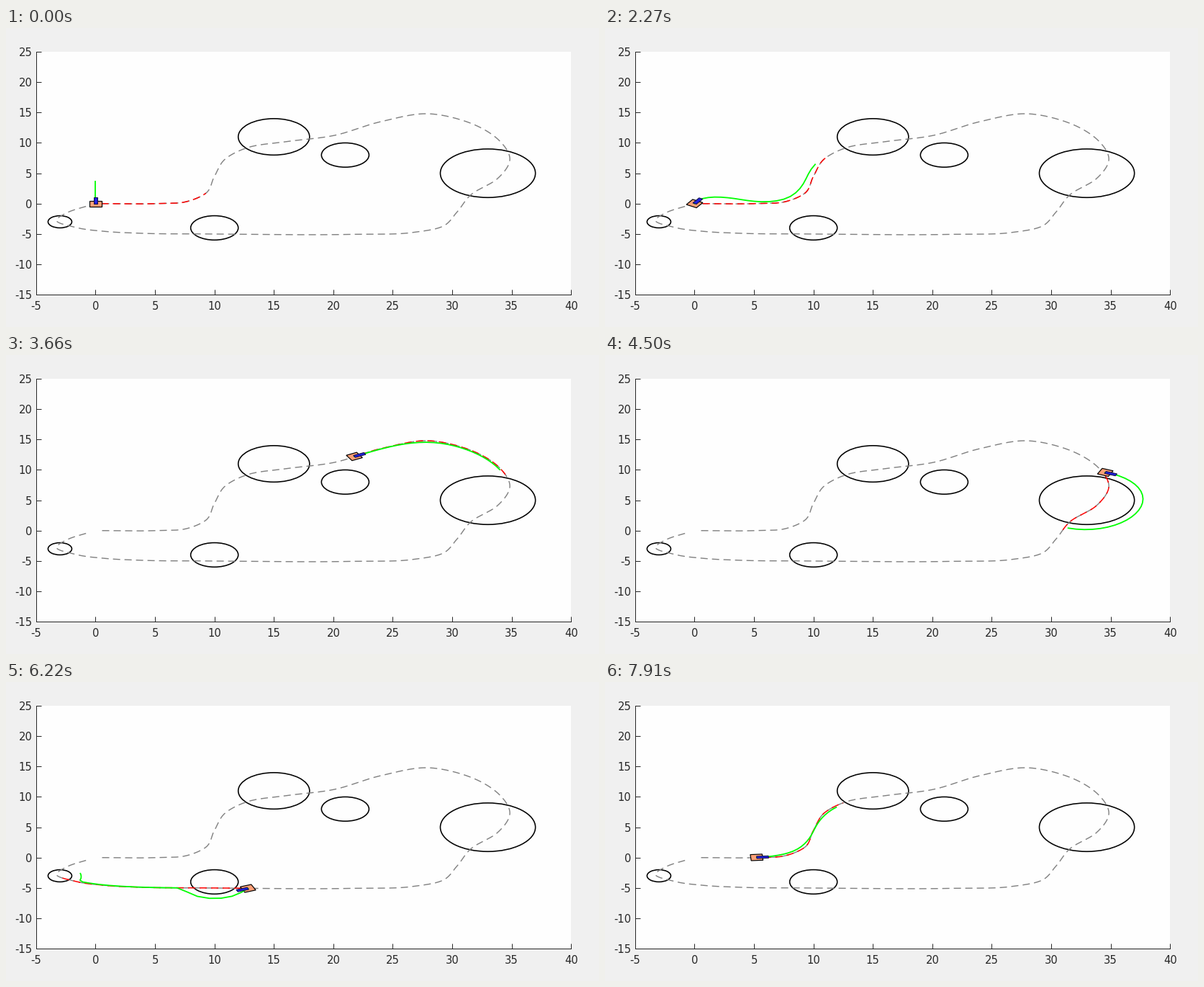
Write a matplotlib script that moves like this. It is 824x415 px and loops after 8 s.

```python
import numpy as np
import matplotlib.pyplot as plt
from matplotlib.animation import FuncAnimation
from matplotlib.patches import Ellipse, Polygon

WIDTH, HEIGHT, DPI = 824, 415, 100
LOOP_MS, STEP_MS = 8000, 40
PX = 72 / DPI
INK = "#262626"

plt.rcParams["font.family"] = "DejaVu Sans"
plt.rcParams["axes.unicode_minus"] = False
plt.rcParams["lines.scale_dashes"] = False

# x, y, radius
OBSTACLES = [(15, 11, 3), (21, 8, 2), (33, 5, 4), (10, -4, 2), (-3, -3, 1)]
MARGIN = .85

WAYPOINTS = [
    (0, 0), (.6, 0), (5, 0), (7.6, .3), (9.2, 1.6), (10, 4.5), (11, 7.5),
    (12.75, 9.2), (16, 10.2), (20, 11.2), (24, 13.5), (28, 14.8),
    (31.2, 13.5), (33.9, 10.5), (34.85, 7.3), (33.8, 4.1), (31.6, 1.5),
    (30.4, -1.4), (29.2, -3.75), (26.7, -4.75), (22, -5.05), (10, -5),
    (4, -4.9), (.9, -4.6), (-1.5, -4), (-3.3, -2.75), (-2.4, -1.5),
    (-.7, -.4), (0, 0)]

# When the robot passes a few places: ms, x, y
PASSES = np.array([
    (2200, 0, 0), (2270, .15, 0), (2530, 3.8, 0), (3660, 22.1, 12.4),
    (4500, 34.9, 9.5), (5520, 28.9, -3.8), (6330, 9.9, -6.7),
    (6700, -.8, -4.4), (7090, -1.4, -2.2), (7910, 5.6, 0),
    (8710, 12.3, 8.4)])

# Overshoot of the plan in slow turns: ms, size, half waves
SWINGS = [(2270, 1.3, 2), (7090, 4.3, 1.15)]

START = np.array([0, 0])
TURN_MS, GO_MS, MOVING_MS = 1750, 2270, 2530
LOOKAHEAD_MS, MIN_REFERENCE = 800, 10


def hermite(query, knots, values):
    """Smooth curve through values placed at the given knots."""
    slope = np.gradient(values, knots, axis=0)
    i = np.clip(np.searchsorted(knots, query) - 1, 0, len(knots) - 2)
    h = (knots[i + 1] - knots[i])[:, None]
    u = (query - knots[i])[:, None] / h
    return ((1 + 2 * u) * (1 - u) ** 2 * values[i]
            + u * (1 - u) ** 2 * h * slope[i]
            + u * u * (3 - 2 * u) * values[i + 1]
            + u * u * (u - 1) * h * slope[i + 1])


def arc_length(points):
    return np.concatenate(
        ([0], np.cumsum(np.hypot(*np.diff(points, axis=0).T))))


def nearest(curve, point):
    return np.argmin(np.hypot(*(curve - point).T))


def blur(curve, reach):
    n = int(reach / SPACING)
    return np.mean([np.roll(curve, k, axis=0) for k in range(-n, n + 1)],
                   axis=0)


def avoid_obstacles(curve):
    curve = curve.copy()
    for x, y, r in OBSTACLES:
        away = curve - (x, y)
        dist = np.hypot(*away.T)[:, None]
        curve = (x, y) + away * np.maximum(1, (r + MARGIN) / dist)
    return curve


corners = np.array(WAYPOINTS, float)
corner_s = arc_length(corners)
LAP = corner_s[-1]
COUNT = 1400
SPACING = LAP / COUNT
COURSE = hermite(np.arange(COUNT) * SPACING, corner_s, corners)

route = blur(avoid_obstacles(blur(COURSE, 2.5)), .5)
ROUTE = np.vstack([route, route[:1]])
ROUTE_S = arc_length(ROUTE)
PASS_S = np.unwrap([ROUTE_S[nearest(route, p)] for p in PASSES[:, 1:]],
                   period=ROUTE_S[-1])


def route_at(t):
    t = np.clip(np.atleast_1d(t), PASSES[0, 0], PASSES[-1, 0])
    s = hermite(t, PASSES[:, 0], PASS_S[:, None])[:, 0] % ROUTE_S[-1]
    return np.column_stack([np.interp(s, ROUTE_S, axis) for axis in ROUTE.T])


def ramp(t, begin, end):
    return np.clip((t - begin) / (end - begin), 0, 1)


def position(t):
    away = ramp(t, GO_MS, MOVING_MS)
    return (1 - away) * START + away * route_at(t)[0]


def heading(t):
    if t < GO_MS + STEP_MS:
        return np.radians(90 - 34 * ramp(t, TURN_MS, GO_MS))
    dx, dy = position(t + 20) - position(t - 20)
    return np.arctan2(dy, dx)


def prediction(t):
    u = np.linspace(0, 1, 24)[:, None]
    pos = position(t)
    plan = route_at(t + u[:, 0] * LOOKAHEAD_MS)
    plan = plan + (pos - plan[0]) * (1 - u)
    for when, size, waves in SWINGS:
        size = size * max(0, 1 - abs(t - when) / 300)
        plan[:, 1:] += size * np.sin(waves * np.pi * u) * (1 - u)
    idle = pos + u * (0, 3.6)
    moving = ramp(t, TURN_MS, GO_MS)
    return (1 - moving) * idle + moving * plan


def reference(t):
    """Stretch of the course ahead of the robot."""
    here, there = (nearest(COURSE, route_at(when)[0])
                   for when in (t, t + LOOKAHEAD_MS))
    length = max(MIN_REFERENCE, (there - here) % COUNT * SPACING + 1)
    begin = here + int(.55 / SPACING)
    end = here + int(length / SPACING)
    return COURSE[np.arange(begin, end) % COUNT]


def box(center, angle, back, front, half):
    c, s = np.cos(angle), np.sin(angle)
    shape = np.array([(back, -half), (front, -half),
                      (front, half), (back, half)])
    return center + shape @ np.array([(c, s), (-s, c)])


fig = plt.figure(figsize=(WIDTH / DPI, HEIGHT / DPI), dpi=DPI,
                 facecolor="#f0f0f0")
ax = fig.add_axes([41.9 / WIDTH, 44.9 / HEIGHT, 743.3 / WIDTH, 337 / HEIGHT],
                  facecolor="#fefefe")
ax.set(xlim=(-5, 40), ylim=(-15, 25),
       xticks=range(-5, 41, 5), yticks=range(-15, 26, 5))
ax.spines[["top", "right"]].set_visible(False)
for side in ("left", "bottom"):
    ax.spines[side].set(color=INK, linewidth=PX)
ax.tick_params(direction="in", length=7 * PX, width=PX, color=INK,
               labelcolor=INK, labelsize=10.6)
ax.tick_params(axis="x", pad=9 * PX)
ax.tick_params(axis="y", pad=5.5 * PX)

DASHED = dict(ls=(0, (10 * PX, 6 * PX)), dash_capstyle="butt")
for x, y, r in OBSTACLES:
    ax.add_patch(Ellipse((x, y), 2 * r, 2 * r, fill=False, ec="black",
                         lw=1.6 * PX, zorder=2))
gap = int(.6 / SPACING)
ax.plot(*COURSE[gap:-gap].T, color="#808080", lw=1.4 * PX, zorder=3, **DASHED)
ref_line, = ax.plot([], [], color="#ff0000", lw=1.5 * PX, zorder=4, **DASHED)
body = ax.add_patch(Polygon(np.zeros((4, 2)), fc="#ffa078", ec="black",
                            lw=1.2 * PX, zorder=5))
nose = ax.add_patch(Polygon(np.zeros((4, 2)), fc="#2020e0", ec="#101040",
                            lw=PX, zorder=7))
plan_line, = ax.plot([], [], color="#00ff00", lw=1.8 * PX, zorder=6)


def draw(frame):
    t = frame * STEP_MS
    pos, angle = position(t), heading(t)
    ref_line.set_data(*reference(t).T)
    plan_line.set_data(*prediction(t).T)
    body.set_xy(box(pos, angle, -.5, .5, .5))
    nose.set_xy(box(pos, angle, 0, 1, .18))
    return ref_line, body, plan_line, nose


anim = FuncAnimation(fig, draw, frames=LOOP_MS // STEP_MS, interval=STEP_MS,
                     repeat=True, repeat_delay=0)
plt.show()
```
